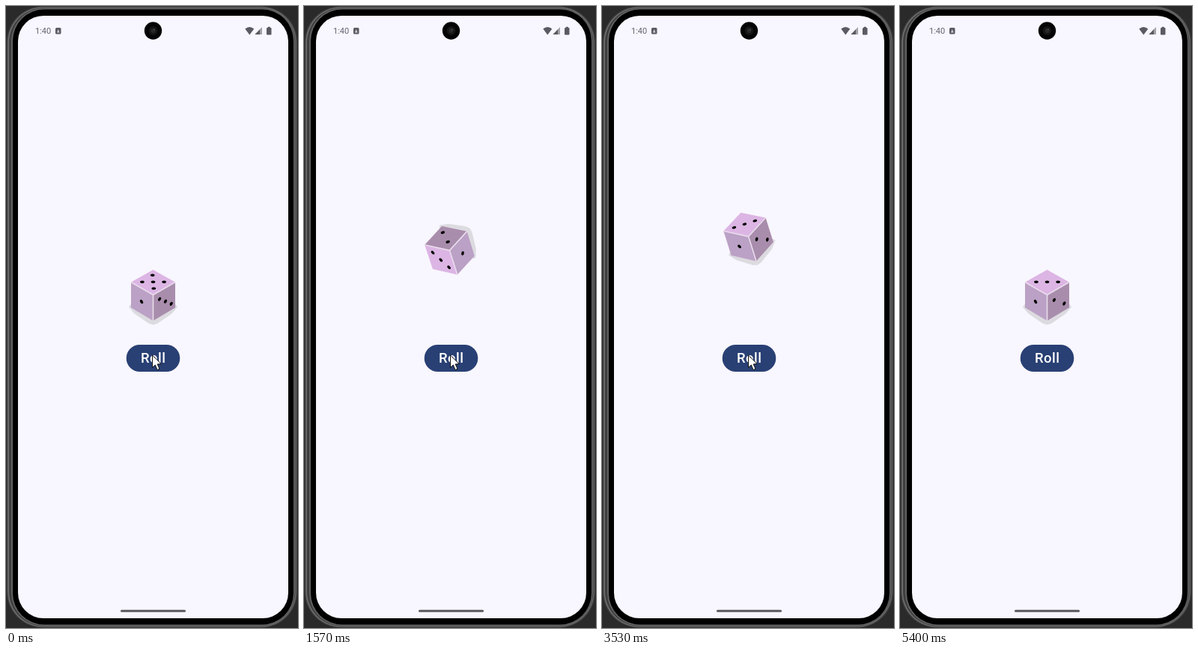
An HTML page with a canvas that plays this animation: 390x830 px, repeating every 5430 ms.

```html
<!DOCTYPE html>
<html lang="en">
<head>
<meta charset="utf-8">
<title>Dice roll</title>
<style>
  html, body { margin: 0; width: 100%; height: 100%; overflow: hidden; background: #2a2a2a; }
  canvas { display: block; width: 390px; height: 830px; }
</style>
</head>
<body>
<canvas id="stage" width="390" height="830"></canvas>
<script>
const ctx = document.getElementById('stage').getContext('2d');
const LOOP = 5430;
const ROLLS = [700, 2390];
const CURSOR_END = 4500;
const SANS = 'Roboto, "Noto Sans", sans-serif';
const INK = '#5a5a62';

// One roll: time since the tap, turn in degrees, height in pixels
const TIMES = [0, 30, 480, 870, 1140, 1190, 1580, 1680];
const TURN = [0, 2, 106, 222, 342, 360, 65, 0];
const LIFT = [0, 0, 11, 64.5, 78, 79, 5.5, 0];

const clamp = v => Math.max(0, Math.min(1, v));

// Smooth curve through the keys without overshoot
function track(xs, ys, x) {
  const n = xs.length;
  if (x <= xs[0]) return ys[0];
  if (x >= xs[n - 1]) return ys[n - 1];
  let i = 0;
  while (x > xs[i + 1]) i++;
  const slope = k => (ys[k + 1] - ys[k]) / (xs[k + 1] - xs[k]);
  const tangent = k => {
    if (k === 0 || k === n - 1) return 0;
    const a = slope(k - 1), b = slope(k);
    return a * b <= 0 ? 0 : 2 * a * b / (a + b);
  };
  const h = xs[i + 1] - xs[i], u = (x - xs[i]) / h, v = 1 - u;
  return ys[i] * v * v * (1 + 2 * u) + ys[i + 1] * u * u * (3 - 2 * u)
    + h * u * v * (tangent(i) * v - tangent(i + 1) * u);
}

function poly(points, fill) {
  ctx.beginPath();
  points.forEach(([x, y]) => ctx.lineTo(x, y));
  ctx.closePath();
  ctx.fillStyle = fill;
  ctx.fill();
}

function box(x, y, w, h, r, fill) {
  ctx.beginPath();
  ctx.roundRect(x, y, w, h, r);
  ctx.fillStyle = fill;
  ctx.fill();
}

function disc(x, y, r, fill) {
  ctx.beginPath();
  ctx.arc(x, y, r, 0, Math.PI * 2);
  ctx.fillStyle = fill;
  ctx.fill();
}

function label(text, x, y, font, fill, align, spacing = 0) {
  ctx.font = font + ' ' + SANS;
  ctx.letterSpacing = spacing + 'px';
  ctx.textAlign = align;
  ctx.fillStyle = fill;
  ctx.fillText(text, x, y);
}

function phone() {
  ctx.fillStyle = '#2a2a2a';
  ctx.fillRect(0, 0, 390, 830);
  box(1, 0.5, 388, 829, 48, '#424242');
  box(2.5, 1.5, 385, 827, 47, '#707070');
  box(4, 2.5, 382.5, 825, 46, '#3e3e3e');
  box(7, 3, 378.5, 824, 44, '#626262');
  box(9, 4.5, 375, 821, 42, '#000');
  box(16, 13, 361, 804, 34, '#f8f6fe');
}

function statusBar() {
  label('1:40', 39, 37, '11px', '#62636f', 'left');
  box(66, 29, 7.5, 8.5, 1.5, INK);
  poly([[69.7, 31], [71.5, 35.5], [68, 35.5]], '#d4d3da');

  ctx.beginPath();
  ctx.moveTo(325.3, 38.5);
  ctx.lineTo(319.3, 30.5);
  ctx.quadraticCurveTo(325.3, 25.5, 331.3, 30.5);
  ctx.closePath();
  ctx.fillStyle = INK;
  ctx.fill();

  poly([[342, 28], [342, 38], [332.5, 38]], '#a2a1a8');
  poly([[339, 31.2], [339, 38], [332.5, 38]], INK);
  box(348, 29, 6.5, 9.5, 1.3, INK);
  box(349.8, 27.8, 3, 2, 0.5, INK);

  disc(196.5, 33, 11.7, '#040404');
  disc(196.5, 33, 6, '#151515');
  disc(196.5, 33, 3, '#282828');
  disc(198, 31.5, 1, '#484848');
}

function pip(x, y, rx, ry, angle) {
  ctx.beginPath();
  ctx.ellipse(x, y, rx, ry, angle, 0, Math.PI * 2);
  ctx.fillStyle = '#000';
  ctx.fill();
}

function dice(turn, lift, rolled) {
  const top = [0, -36.5], left = [-29.5, -20], right = [29.5, -20];
  const mid = [0, -3], low = [0, 31.5];
  const lowLeft = [-29.5, 14], lowRight = [29.5, 14];

  ctx.save();
  ctx.translate(196.5, 388.5 - lift);
  ctx.rotate(turn * Math.PI / 180);

  poly([[-29.5, 9], [-32.5, 13], [-25, 22], [-6, 35], [0, 37], [6, 35],
    [25, 22], [32.5, 13], [29.5, 9]], '#dcdbe0');
  poly([top, right, mid, left], '#dcb5e4');
  poly([left, mid, low, lowLeft], '#bba1c5');
  poly([right, mid, low, lowRight], '#a98dac');

  ctx.strokeStyle = '#e9dcec';
  ctx.lineWidth = 1.6;
  ctx.lineJoin = 'round';
  ctx.beginPath();
  ctx.moveTo(...left);
  ctx.lineTo(...mid);
  ctx.lineTo(...right);
  ctx.moveTo(...mid);
  ctx.lineTo(...low);
  ctx.stroke();

  const flat = (x, y) => pip(x, y, 2.9, 1.7, 0.05);
  const side = (x, y) => pip(x, y, 1.8, 2.8, 0.55);
  [-14.6, 0, 14.6].forEach(x => flat(x, -20.3));
  pip(-15.5, 6, 1.8, 2.8, -0.55);
  if (rolled) {
    side(9.4, 3.8);
    side(22.8, 8.5);
  } else {
    flat(-0.8, -29.3);
    flat(0.8, -11.6);
    [0, 1, 2].forEach(i => side(8.6 + i * 7.8, 2.6 + i * 3.1));
  }
  ctx.restore();
}

function button(press) {
  box(160.7, 452, 71.6, 36, 18, '#294074');
  if (press > 0) {
    ctx.globalAlpha = press;
    box(160.7, 452, 71.6, 36, 18, '#415780');
    ctx.globalAlpha = 1;
  }
  label('Roll', 196.8, 476, '500 18.5px', '#fff', 'center', 0.5);
}

function cursor() {
  ctx.save();
  ctx.translate(195.5, 466);
  const arrow = [[0, 0], [0, 16.5], [3.8, 13], [6.6, 19.5], [9.5, 18.2], [6.7, 11.9], [11.8, 11.7]];
  poly(arrow, '#fff');
  ctx.strokeStyle = '#111';
  ctx.lineWidth = 1;
  ctx.stroke();
  ctx.restore();
}

function draw(t) {
  const start = ROLLS.filter(s => s <= t).pop();
  const rolled = start !== undefined;
  const dt = rolled ? t - start : 0;
  const press = rolled ? clamp((dt + 20) / 50) * clamp((700 - dt) / 180) : 0;

  phone();
  statusBar();
  dice(track(TIMES, TURN, dt), track(TIMES, LIFT, dt), rolled);
  button(press);
  if (t < CURSOR_END) cursor();
  box(153, 805.7, 87, 3, 1.5, '#5a5a5e');
}

const began = performance.now();
function frame() {
  draw((performance.now() - began) % LOOP);
  requestAnimationFrame(frame);
}
frame();
</script>
</body>
</html>
```
